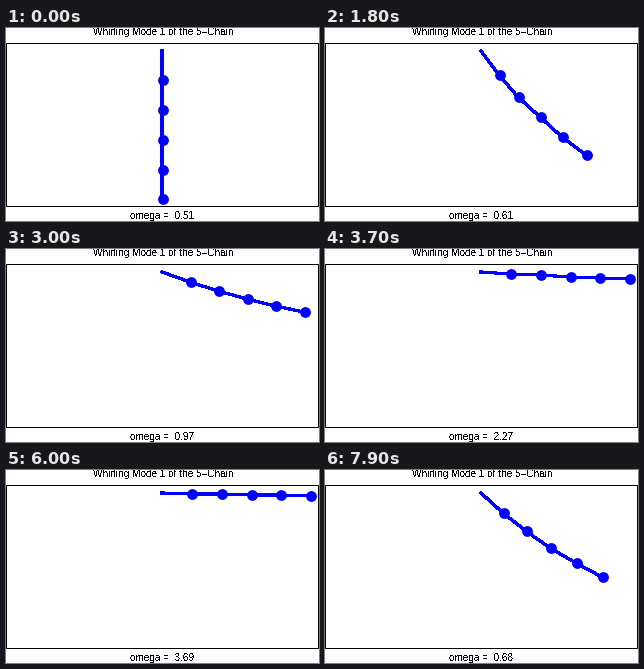
Animation of 313 by 193 pixels, one loop 8 s. Source, as a matplotlib script:

```python
import numpy as np
import matplotlib.pyplot as plt
from matplotlib.animation import FuncAnimation
from matplotlib.patches import Rectangle

WIDTH, HEIGHT, DPI = 313, 193, 72
FRAMES, INTERVAL = 80, 100
LINKS, LINK_PX = 5, 29.7
PIVOT = (156.2, 22.3)
BLUE = "#0000ff"

plt.rcParams["text.antialiased"] = False


def whirling_branch(tip_slopes):
    """First whirling mode of the chain (unit links, masses and gravity).

    Returns radii, depths and angular speeds, one row per tip slope.
    """
    hanging = np.arange(LINKS, 0, -1)
    x = np.tile(np.arange(1.0, LINKS + 1), (len(tip_slopes), 1))
    for _ in range(80):
        speed2 = tip_slopes / x[:, -1]
        outward = np.cumsum(x[:, ::-1], axis=1)[:, ::-1]
        angle = np.arctan(speed2[:, None] * outward / hanging)
        x = np.cumsum(np.sin(angle), axis=1)
    return x, np.cumsum(np.cos(angle), axis=1), np.sqrt(speed2)


radii, depths, speeds = whirling_branch(np.geomspace(1e-3, 600, 6000))
branch = np.column_stack([radii, depths, speeds])

# Step along the branch by arc length in (radii, depths, scaled speed).
state = np.column_stack([radii, depths, 0.88 * speeds])
steps = np.linalg.norm(np.diff(state, axis=0), axis=1)
arc = np.concatenate([[0], np.cumsum(steps)])

KEY_STEPS = [0, 1, 10, 18, 30, 32, 46, 50]
KEY_DEPTHS = [5, 4.9985, 4.515, 3.50, 1.367, 0.998, 0.04253, 0.0267]
key_arcs = np.interp(KEY_DEPTHS, depths[::-1, -1], arc[::-1])


def pose(frame):
    step = min(frame, 101 - frame)
    s = np.interp(step, KEY_STEPS, key_arcs)
    values = np.array([np.interp(s, arc, column) for column in branch.T])
    return values[:LINKS], values[LINKS:-1], values[-1]


fig = plt.figure(figsize=(WIDTH / DPI, HEIGHT / DPI), dpi=DPI, facecolor="white")
ax = fig.add_axes([0, 0, 1, 1])
ax.set(xlim=(0, WIDTH), ylim=(HEIGHT, 0))
ax.axis("off")

ax.add_patch(Rectangle((0.5, 15.5), 312, 163, fill=False, ec="black", lw=1,
                       snap=False))
font = dict(family="Liberation Sans", size=10, color="black", va="baseline")
ax.text(157.5, 7, "Whirling Mode 1 of the 5\u2013Chain", ha="center", **font)
label = ax.text(124.5, 191, "", ha="left", **font)
crisp = dict(color=BLUE, antialiased=False, snap=False)
rod, = ax.plot([], [], lw=2.2, solid_capstyle="projecting", **crisp)
masses, = ax.plot([], [], "o", ms=10.8, mew=0, **crisp)


def draw(frame):
    x, z, omega = pose(frame)
    # Joints sit on whole pixels, as in an unsmoothed drawing.
    px = np.floor(PIVOT[0] + LINK_PX * np.append(0, x))
    py = np.floor(PIVOT[1] + LINK_PX * np.append(0, z))
    rod.set_data(px, py + 1)
    masses.set_data(px[1:] + 0.5, py[1:] + 0.5)
    label.set_text(f"omega =  {omega:.2f}")
    return rod, masses, label


anim = FuncAnimation(fig, draw, frames=FRAMES, interval=INTERVAL,
                     repeat=True, repeat_delay=0, blit=False)
plt.show()
```
